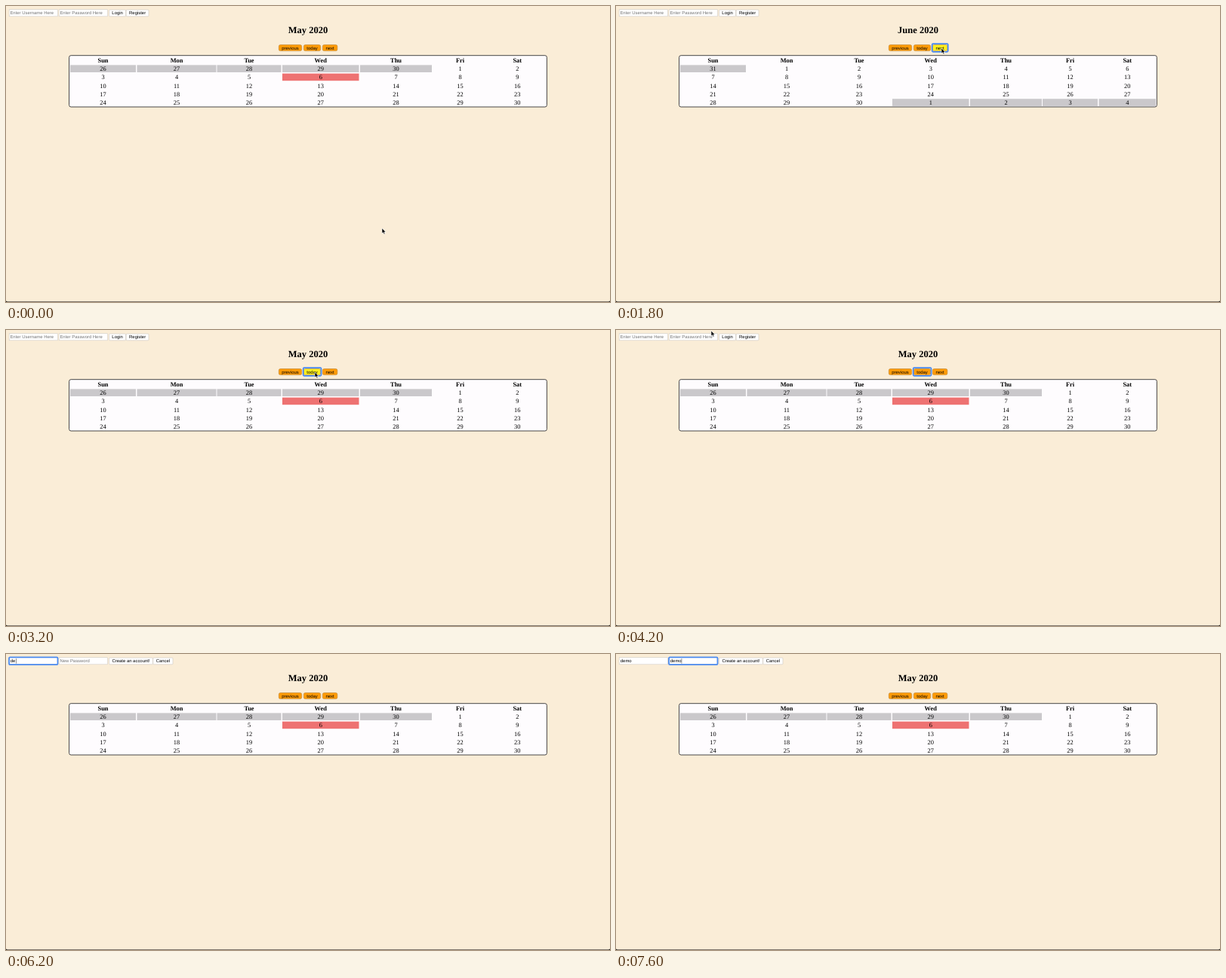
Recreate the animation shown at these times as an HTML page. Size 800x393 px, loop 8000 ms.

```html
<!DOCTYPE html>
<html lang="en">
<head>
<meta charset="utf-8">
<title>Calendar</title>
<style>
  html, body { margin: 0; width: 100%; height: 100%; overflow: hidden; background: #faedd7; }
  svg { display: block; width: 100%; height: 100%; }
  text { font: 5.93px "Liberation Sans", Arial, sans-serif; text-rendering: geometricPrecision; white-space: pre; }
  .serif { font: 8.4px "Liberation Serif", Times, serif; }
  .bold { font-weight: bold; }
  .title { font-size: 12.5px; }
  .option { font: 500 5.7px Inter, sans-serif; }
</style>
</head>
<body>
<svg id="stage" viewBox="0 0 800 393"></svg>
<script>
const LOOP = 8000;
const DAYS = ['Sun', 'Mon', 'Tue', 'Wed', 'Thu', 'Fri', 'Sat'];
const MONTHS = { 4: 'May', 5: 'June', 6: 'July' };
const COLUMNS = [[85, 172], [173.5, 278.5], [279.5, 364.5], [366, 467.5], [469, 564], [565, 638], [639.5, 715]];
const NAV = [['previous', 361, 392], ['today', 394, 417], ['next', 419, 439.2]];
const ACCOUNTS = ['tam738', 'oved', 'pelam', 'vam.teo@quorl.test', 'tevo', 'corvi902'];

// Each step overrides part of the state; everything else carries on.
const START = { month: 4, at: [498, 295], hover: -1, focus: '', form: 'login', list: false, user: '', pass: '' };
const STEPS = [
  [200, { at: [415, 190] }],
  [400, { at: [250, 140] }],
  [600, { at: [126, 30] }],
  [800, { at: [330, 150] }],
  [1000, { at: [425, 107], hover: 17 }],
  [1200, { at: [443, 93] }],
  [1400, { at: [440, 78], hover: -1 }],
  [1600, { at: [431, 56] }],
  [1800, { month: 5, focus: 'next' }],
  [2200, { month: 6 }],
  [2600, { at: [428, 57] }],
  [2800, { at: [409, 56] }],
  [3000, { month: 4, focus: 'today' }],
  [3400, { at: [414, 74] }],
  [3600, { at: [440, 120], hover: 24 }],
  [3800, { at: [340, 60], hover: -1 }],
  [4000, { at: [210, 20] }],
  [4200, { at: [126, 1] }],
  [4600, { at: [174, 9] }],
  [4800, { at: [426, 40], form: 'register', focus: '' }],
  [5000, { at: [260, 25] }],
  [5200, { at: [60, 8] }],
  [5400, { at: [46.7, 7], focus: 'user', list: true }],
  [5800, { at: [313, 62] }],
  [6000, { at: null, list: false, user: 'd' }],
  [6200, { user: 'de' }],
  [6400, { user: 'dem' }],
  [6600, { user: 'demo' }],
  [6800, { focus: 'pass' }],
  [7000, { at: [313, 62], pass: 'd' }],
  [7200, { at: null, pass: 'de' }],
  [7400, { pass: 'dem' }],
  [7600, { pass: 'demo' }]
];

const rect = (x1, y1, x2, y2, fill, more = '') =>
  `<rect x="${x1}" y="${y1}" width="${x2 - x1}" height="${y2 - y1}" fill="${fill}" ${more}/>`;
const text = (x, y, words, more = '') => `<text x="${x}" y="${y}" ${more}>${words}</text>`;
const centered = (x, y, words, style = '') => text(x, y, words, `text-anchor="middle" class="${style}"`);
const ring = (x1, y1, x2, y2) =>
  rect(x1, y1, x2, y2, 'none', 'rx="1.2" stroke="#4a8af0" stroke-width="1.8"');

function field(name, x, value, hint, focused) {
  let out = rect(x, 4.7, x + 64.3, 13.8, '#fff', 'stroke="#d0ccc6" stroke-width=".6"');
  if (focused) out += ring(x - .1, 4.3, x + 64.3, 14.1);
  out += value ? text(x + 1.6, 11.4, value) : text(x + 1.2, 11.4, hint, 'fill="#757575"');
  if (focused) {
    const caret = x + 1.5 + value.length * 3.75;
    out += rect(caret, 6, caret + .5, 12.6, '#222');
  }
  return out;
}

const formButton = (label, x1, x2) =>
  rect(x1, 5, x2, 13.8, '#fff', 'rx="1" stroke="#cbc7c2" stroke-width=".6"') +
  centered((x1 + x2) / 2, 11.4, label);

function accountForm(s) {
  const login = s.form === 'login', verb = login ? 'Enter ' : 'New ', tail = login ? ' Here' : '';
  return field('user', 4.2, s.user, verb + 'Username' + tail, s.focus === 'user') +
    field('pass', 70.2, s.pass, verb + 'Password' + tail, s.focus === 'pass') +
    (login
      ? formButton('Login', 136.6, 158.6) + formButton('Register', 159.2, 189)
      : formButton('Create an account!', 136.6, 194.4) + formButton('Cancel', 194.8, 221));
}

function navButton([label, x1, x2], s) {
  const [x, y] = s.at || [-1, -1];
  const over = x > x1 && x < x2 && y > 51 && y < 60;
  return rect(x1 + .3, 51.5, x2 - .3, 59.6, over ? '#fff01e' : '#ff9b08',
      'rx="2.2" stroke="#b9883f" stroke-width=".6"') +
    (s.focus === label ? ring(x1 - .3, 50.2, x2 + .5, 60.8) : '') +
    centered((x1 + x2) / 2, 57.6, label);
}

function calendar(s) {
  let out = centered(400, 36.3, MONTHS[s.month] + ' 2020', 'serif bold title') +
    rect(83.6, 65.7, 716.4, 134, '#fefcfe', 'rx="2.5" stroke="#333" stroke-width=".9"');
  const offset = new Date(2020, s.month, 1).getDay();
  COLUMNS.forEach(([x1, x2], column) => {
    const middle = (x1 + x2) / 2;
    out += centered(middle, 74.9, DAYS[column], 'serif bold');
    for (let row = 0; row < 5; row++) {
      const index = row * 7 + column, y = 78.4 + row * 11.22;
      const date = new Date(2020, s.month, 1 - offset + index), day = date.getDate();
      const fill = date.getMonth() !== s.month ? '#cac8cb'
        : s.month === 4 && day === 6 ? '#ee7272'
        : s.hover === index ? '#a1d1e2' : '';
      if (fill) out += rect(x1, y, x2, y + 9.6, fill);
      out += centered(middle, y + 7.7, day, 'serif');
    }
  });
  return out;
}

const accountList = () =>
  rect(3.4, 15, 85, 112, '#000', 'opacity=".13" rx="1"') +
  rect(4, 14.9, 84.3, 111.2, '#fefcfe') +
  ACCOUNTS.map((name, i) => text(9, 27.6 + i * 15, name, 'class="option"')).join('');

function pointer([x, y]) {
  const overField = x < 134 && y > 4 && y < 14;
  const shape = overField
    ? '<path d="M-1.6-4.3Q0-4.3 0-3.2Q0-4.3 1.6-4.3M0-3.2V3.2M-1.6 4.3Q0 4.3 0 3.2Q0 4.3 1.6 4.3" fill="none" stroke="#222" stroke-width=".8"/>'
    : '<path d="M0 0V7L1.6 5.6L2.7 8.1L4 7.5L2.9 5.1H5Z" stroke="#fff" stroke-width=".6"/>';
  return `<g transform="translate(${x} ${y})">${shape}</g>`;
}

const windowEdge = () =>
  rect(0, 392.3, 800, 393, '#4b463f') +
  '<path d="M0 390.5Q0 393 2.5 393H0ZM800 390.5Q800 393 797.5 393H800Z"/>';

const render = s =>
  accountForm(s) + NAV.map(b => navButton(b, s)).join('') + calendar(s) +
  (s.list ? accountList() : '') + windowEdge() + (s.at ? pointer(s.at) : '');

const stage = document.getElementById('stage');
let shown = -1;

function tick() {
  const time = performance.now() % LOOP;
  const passed = STEPS.filter(([start]) => start <= time);
  if (passed.length !== shown) {
    shown = passed.length;
    stage.innerHTML = render(Object.assign({}, START, ...passed.map(([, change]) => change)));
  }
  requestAnimationFrame(tick);
}
tick();
</script>
</body>
</html>
```
